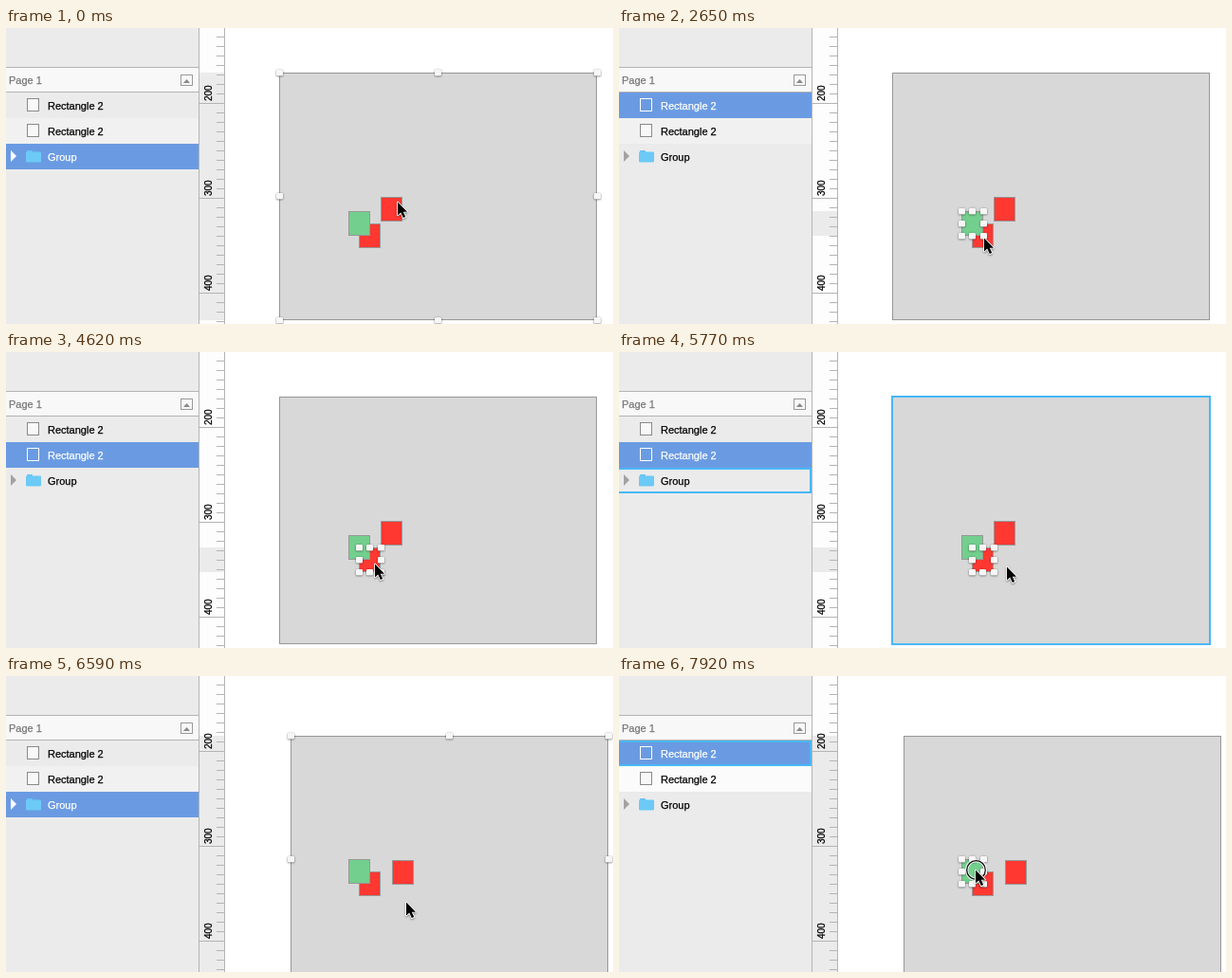
Write an HTML page with a canvas that moves like this. It is 640 by 312 pixels and loops after 8000 ms.

```html
<!DOCTYPE html>
<html lang="en">
<head>
<meta charset="utf-8">
<title>Layer selection</title>
<style>
html, body { margin: 0; width: 100%; height: 100%; overflow: hidden; background: #fff; }
canvas { display: block; }
</style>
</head>
<body>
<canvas id="stage" width="640" height="312"></canvas>
<script>
const ctx = document.getElementById('stage').getContext('2d');
const LOOP = 8000, TICK = 88;
const BLUE = '#48b8f8', SELECTED = '#6a9be2', BORDER = '#979797', LINE = '#b4b4b4', RED_FILL = '#ff3832';
const FONT = '"Liberation Sans", Arial, sans-serif';
const GREEN = 0, RED = 1, GROUP = 2;

const moves = [
  { from: 0, to: 170, x: 409, y: 190 },
  { from: 350, to: 530, x: 381, y: 207 },
  { from: 610, to: 880, x: 369, y: 209 },
  { from: 1150, to: 1500, x: 375, y: 204 },
  { from: 1950, to: 3000, x: 389, y: 229 },
  { from: 4530, to: 4800, x: 387, y: 210 },
  { from: 5330, to: 5680, x: 408, y: 226 },
  { from: 5770, to: 5860, x: 409, y: 222 },
  { from: 5950, to: 6330, x: 421, y: 238 },
  { from: 6590, to: 7830, x: 375, y: 204 }
];

// The last click drags the group, whose selection is where the loop begins
const clicks = [
  { layer: GROUP, hover: 0, down: 0, up: 0 },
  { layer: GREEN, hover: 530, down: 1590, up: 1770 },
  { layer: RED, hover: 2740, down: 3090, up: 3270 },
  { layer: GROUP, hover: 5500, down: 5950, up: 6500 },
  { layer: GREEN, hover: 7650, down: 7920, up: LOOP }
];

// Progress from 0 to 1 in steps of the screen recording's frame rate
function progress(t, from, to) {
  const steps = Math.round((to - from) / TICK);
  const u = Math.min(1, Math.max(0, (t - from) / (to - from)));
  return Math.floor(u * steps + .02) / steps;
}

function cursorAt(t) {
  let x = 412, y = 183;
  for (const move of moves) {
    const u = progress(t, move.from, move.to);
    x += (move.x - x) * u;
    y += (move.y - y) * u;
  }
  return [Math.round(x), Math.round(y)];
}

function fill(x, y, w, h, color) {
  ctx.fillStyle = color;
  ctx.fillRect(x, y, w, h);
}

function outline(x, y, w, h, color, width = 1) {
  ctx.strokeStyle = color;
  ctx.lineWidth = width;
  ctx.strokeRect(x, y, w, h);
}

function rounded(x, y, w, h, r, color) {
  ctx.beginPath();
  ctx.roundRect(x, y, w, h, r);
  ctx.fillStyle = color;
  ctx.fill();
}

function polygon(color, ...points) {
  ctx.beginPath();
  points.forEach(([x, y]) => ctx.lineTo(x, y));
  ctx.closePath();
  ctx.fillStyle = color;
  ctx.fill();
}

function text(str, x, y, color, size = 11) {
  ctx.font = `${size}px ${FONT}`;
  ctx.fillStyle = ctx.strokeStyle = color;
  ctx.lineWidth = .25;
  ctx.fillText(str, x, y);
  ctx.strokeText(str, x, y);
}

function shape({ x, y, w, h, color }) {
  fill(x, y, w, h, color);
  outline(x + .5, y + .5, w - 1, h - 1, BORDER);
}

function handles({ x, y, w, h }) {
  ctx.save();
  ctx.shadowColor = 'rgba(0,0,0,.65)';
  ctx.shadowBlur = 2;
  ctx.shadowOffsetY = .5;
  for (const i of [0, .5, 1]) for (const j of [0, .5, 1]) {
    if (i === .5 && j === .5) continue;
    rounded(Math.floor(x + w * i) - 3, Math.floor(y + h * j) - 3, 7, 6.5, 1, '#f6f6f6');
  }
  ctx.restore();
}

function layerIcon(y, selected) {
  if (!selected) fill(23, y + 7, 12, 13, '#f8f8f8');
  outline(22.5, y + 6.5, 12, 13, selected ? '#fff' : '#8a8a8a');
}

function folderIcon(y, selected) {
  polygon(selected ? '#fff' : '#a2a2a2', [5, y + 7], [11, y + 13], [5, y + 19]);
  rounded(22, y + 7, 6, 4, 1, '#62c4f2');
  rounded(21, y + 8.5, 16, 11, 1, '#6ccaf6');
}

function drawPanel(selected, hovered, pressed) {
  fill(0, 0, 203, 312, '#ebebeb');
  fill(0, 41, 203, 1, LINE);
  fill(0, 42, 203, 25, '#f8f8f8');
  fill(0, 67, 203, 1, LINE);
  text('Page 1', 3, 59, '#777');
  outline(184.5, 49.5, 12, 11, '#999');
  polygon('#888', [187, 58], [190.5, 54], [194, 58]);

  ['Rectangle 2', 'Rectangle 2', 'Group'].forEach((label, row) => {
    const y = 68 + row * 27, active = row === selected;
    if (row === RED) fill(0, y, 203, 27, pressed && selected === GREEN ? '#fbfbfb' : '#f1f1f1');
    if (active) fill(0, y, 203, 27, SELECTED);
    (row === GROUP ? folderIcon : layerIcon)(y, active);
    text(label, 44, y + 18, active ? '#fff' : '#000');
  });
  if (hovered !== null) outline(-2, 69 + hovered * 27, 204, 25, BLUE, 2);
  fill(203, 0, 1, 312, LINE);
}

function drawRuler({ y, h }) {
  fill(204, 0, 26, 312, '#fdfdfd');
  fill(204, y, 26, h, '#ebebeb');
  for (let tick = 9; tick < 312; tick += 10) {
    const length = tick % 100 === 79 ? 26 : 8;
    fill(230 - length, tick, length, 1, LINE);
  }
  fill(230, 0, 1, 312, LINE);
  for (let n = 2; n < 5; n++) {
    ctx.save();
    ctx.translate(217, n * 100 - 123);
    ctx.rotate(-Math.PI / 2);
    text(n * 100, 0, 0, '#000', 10);
    ctx.restore();
  }
}

function drawCursor(x, y, pressed) {
  if (pressed) {
    ctx.beginPath();
    ctx.arc(x + 1.5, y + .5, 9.8, 0, Math.PI * 2);
    for (const [color, width] of [['rgba(255,255,255,.8)', 3.4], ['#111', 1.3]]) {
      ctx.strokeStyle = color;
      ctx.lineWidth = width;
      ctx.stroke();
    }
  }
  ctx.save();
  ctx.translate(x + 1, y + .5);
  ctx.lineJoin = 'round';
  ctx.shadowColor = 'rgba(0,0,0,.35)';
  ctx.shadowBlur = 2;
  ctx.shadowOffsetY = 1;
  const arrow = [[0, 0], [0, 14], [3.3, 11], [5.8, 16.6], [8.2, 15.6], [5.8, 10.2], [10, 10.2]];
  polygon('#fff', ...arrow);
  ctx.strokeStyle = '#fff';
  ctx.lineWidth = 1.7;
  ctx.stroke();
  ctx.shadowColor = 'transparent';
  polygon('#000', ...arrow);
  ctx.restore();
}

function draw(t) {
  const index = clicks.findLastIndex(click => click.down <= t);
  const { layer: selected, up } = clicks[index];
  const pressed = t < up;
  const hover = clicks.find(click => click.hover <= t && t < click.up);
  const hovered = hover ? hover.layer : null;
  // The ruler follows a selection on release, or at once while dragging
  const measured = pressed && selected !== GROUP ? clicks[index - 1].layer : selected;

  const drag = progress(t, 5950, 6330);
  const dx = Math.round(12 * drag), dy = Math.round(16 * drag);
  const small = { w: 23, h: 26 };
  const shapes = [
    { ...small, x: 361, y: 193, color: '#73cf8d' },
    { ...small, x: 372, y: 206, color: RED_FILL },
    { x: 288 + dx, y: 47 + dy, w: 335, h: 261, color: '#d8d8d8' }
  ];
  const groupChild = { ...small, x: 395 + dx, y: 178 + dy, color: RED_FILL };

  fill(0, 0, 640, 312, '#fff');
  [shapes[GROUP], groupChild, shapes[RED], shapes[GREEN]].forEach(shape);
  if (hovered !== null && hovered !== selected) {
    const { x, y, w, h } = shapes[hovered];
    outline(x, y, w, h, BLUE, 2);
  }
  handles(shapes[selected]);
  drawRuler(shapes[measured]);
  drawPanel(selected, hovered, pressed);
  drawCursor(...cursorAt(t), pressed);
}

const start = performance.now();
function frame() {
  draw((performance.now() - start) % LOOP);
  requestAnimationFrame(frame);
}
frame();
</script>
</body>
</html>
```
